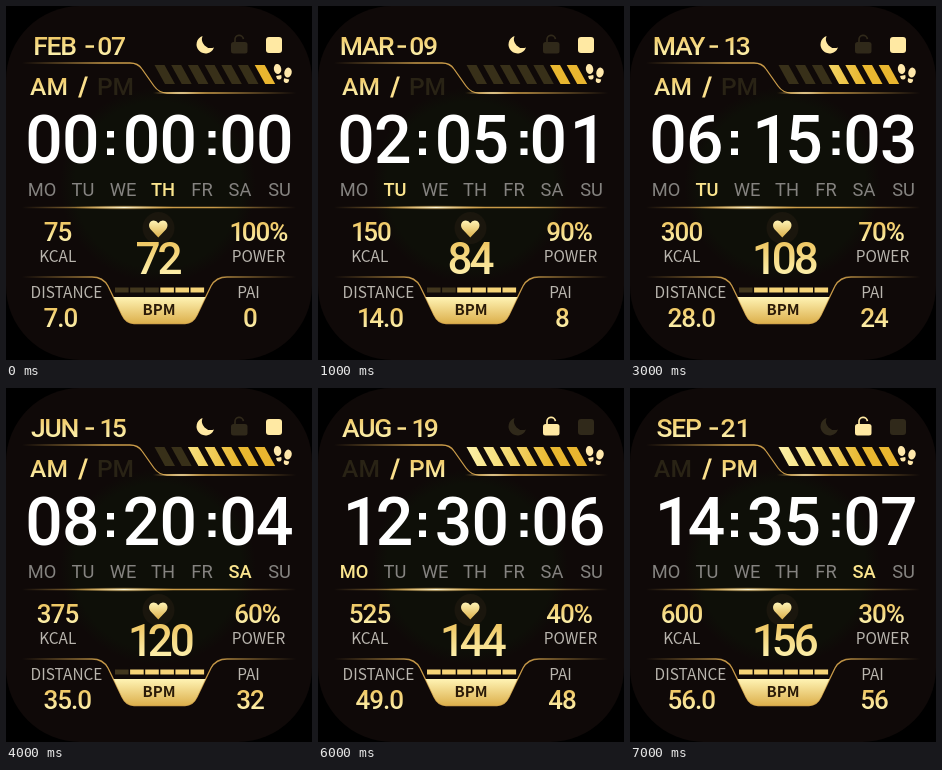
Animation of 306x354 px, one loop 8 s. Source, as an HTML page:

```html
<!DOCTYPE html>
<html lang="en">
<head>
<meta charset="utf-8">
<title>Watch face</title>
<style>
  html, body { margin: 0; width: 100%; height: 100%; overflow: hidden; background: #000; }
  svg { display: block; width: 306px; height: 354px; }
  text { font-family: Roboto, sans-serif; text-anchor: middle; }
  .gold { fill: url(#gold); font-weight: 500; }
  .date { font-size: 26.5px; letter-spacing: -1.3px; }
  .half { font-size: 24.5px; }
  .time text { font-size: 66px; font-weight: 500; letter-spacing: -.8px; fill: #fff; }
  .days text { font-size: 18.3px; fill: #858380; }
  .days .on { fill: #fbe58e; font-weight: 500; }
  .value { font-size: 26px; letter-spacing: -1px; }
  .pulse { font-size: 44px; letter-spacing: -3px; }
  .label { font: 15.4px "Noto Sans CJK SC", "Noto Sans CJK JP", "Noto Sans", sans-serif; fill: #b9b5ae; }
  .bpm { font: 700 15px "Noto Sans CJK SC", "Noto Sans CJK JP", "Noto Sans", sans-serif; fill: #2a1a08; }
  .start { text-anchor: start; }
  .icon { color: #30291a; }
  .icon.on { color: #ffe9a3; }
  .half.off { fill: #292315; }
  .line { fill: none; stroke-width: 1.3; }
</style>
</head>
<body>
<svg viewBox="0 0 306 354">
  <defs>
    <linearGradient id="gold" x2="0" y2="1">
      <stop offset=".2" stop-color="#efc865"/>
      <stop offset=".8" stop-color="#fdf0ab"/>
    </linearGradient>
    <linearGradient id="cup" x2="0" y2="1">
      <stop stop-color="#fff3b4"/>
      <stop offset="1" stop-color="#dcb04c"/>
    </linearGradient>
    <linearGradient id="steps" gradientUnits="userSpaceOnUse" x1="150" x2="268" y1="0" y2="0">
      <stop stop-color="#fcf0a6"/>
      <stop offset=".3" stop-color="#f6dd78"/>
      <stop offset=".7" stop-color="#e9b830"/>
      <stop offset="1" stop-color="#e9b52f"/>
    </linearGradient>
    <linearGradient id="line" gradientUnits="userSpaceOnUse" x1="16" x2="290" y1="0" y2="0">
      <stop stop-color="#c89a48" stop-opacity="0"/>
      <stop offset=".3" stop-color="#c89a48"/>
      <stop offset=".7" stop-color="#c89a48"/>
      <stop offset="1" stop-color="#c89a48" stop-opacity="0"/>
    </linearGradient>
    <radialGradient id="glow">
      <stop stop-color="#fff8d6"/>
      <stop offset="1" stop-color="#e0a83c" stop-opacity="0"/>
    </radialGradient>
    <radialGradient id="dial">
      <stop offset=".85" stop-color="#0e0f08"/>
      <stop offset="1" stop-color="#0e0f08" stop-opacity="0"/>
    </radialGradient>
    <g id="foot">
      <ellipse cy="-2.500" rx="3.700" ry="5"/>
      <path d="M-2.600 4H2.600V5.500a2.600 2.600 0 0 1-5.200 0Z"/>
    </g>
  </defs>

  <rect width="306" height="354" rx="74" fill="#0f0908"/>
  <circle cx="152" cy="179" r="98" fill="url(#dial)"/>

  <path class="line" stroke="url(#line)" d="M16 57H124Q132 57 136 63L148 80Q153 87 161 87H290"/>
  <ellipse cx="175" cy="87" rx="30" ry="1.600" fill="url(#glow)"/>
  <path class="line" stroke="url(#line)" d="M16 201.500H290"/>
  <ellipse cx="118" cy="201.500" rx="55" ry="2.300" fill="url(#glow)"/>
  <path class="line" stroke="url(#line)"
    d="M16 271H86Q97 271 102 280L116 309Q120 317.500 128 317.500H179Q187 317.500 191 309L205 280Q210 271 221 271H290"/>
  <path fill="url(#cup)" d="M107.500 291H199.500L191 309Q187 317.500 179 317.500H128Q120 317.500 116 309Z"/>

  <text class="gold date" id="month" x="48.500" y="49"/>
  <rect x="79.500" y="39.300" width="8.500" height="2.500" fill="#fbe08c"/>
  <text class="gold date" id="day" x="105" y="49"/>
  <text class="gold half" id="am" x="43" y="89">AM</text>
  <path d="M79 70.500h2.900L75 91.500H72.100Z" fill="#fbe08c"/>
  <text class="gold half" id="pm" x="109.500" y="89">PM</text>

  <path class="icon" id="moon" fill="currentColor" d="M196.500 30A9 9 0 1 0 208 41.500A9 9 0 0 1 196.500 30Z"/>
  <g class="icon" id="lock">
    <rect x="225" y="36" width="16.500" height="11.500" rx="2.500" fill="currentColor"/>
    <path d="M229 37V34a4.200 4.200 0 0 1 8.400-.800" fill="none" stroke="currentColor" stroke-width="1.700"/>
  </g>
  <rect class="icon" id="link" x="260" y="31" width="16" height="16" rx="3" fill="currentColor"/>

  <g id="bars"/>
  <g fill="#ffe8ab">
    <use href="#foot" transform="translate(272 65.500) rotate(-10)"/>
    <use href="#foot" transform="translate(281.500 69) rotate(12)"/>
  </g>

  <g class="time">
    <text id="hour" x="56" y="157"/>
    <text id="minute" x="153.500" y="157"/>
    <text id="second" x="250" y="157"/>
    <path fill="#fff" d="M101 125h7v6.500h-7zM101 142.500h7v6.500h-7zM202.500 125h7v6.500h-7zM202.500 142.500h7v6.500h-7z"/>
  </g>
  <g class="days" id="days"/>

  <circle cx="152.500" cy="222" r="16" fill="#1a160d"/>
  <path fill="url(#cup)" d="M152.300 231.500L144.500 223.300C141.500 219.500 143.500 214.500 147.800 214.500Q150.800 214.500 152.300 217.300Q153.800 214.500 156.800 214.500C161.100 214.500 163.100 219.500 160.100 223.300Z"/>
  <text class="gold pulse" id="pulse" x="151.500" y="268"/>
  <g id="zones"/>
  <text class="bpm" x="153" y="309">BPM</text>

  <text class="gold value" id="kcal" x="51.500" y="235"/>
  <text class="label" x="51.700" y="256">KCAL</text>
  <text class="gold value" id="power" x="251" y="235"/>
  <text class="label" x="252.500" y="256">POWER</text>
  <text class="label" x="60.500" y="292">DISTANCE</text>
  <text class="gold value start" id="distance" x="37.500" y="321"/>
  <text class="label" x="242.500" y="292">PAI</text>
  <text class="gold value" id="pai" x="244" y="321"/>
</svg>
<script>
  const $ = id => document.getElementById(id);
  const MONTHS = ["FEB", "MAR", "APR", "MAY", "JUN", "JUL", "AUG", "SEP"];
  const DAYS = ["MO", "TU", "WE", "TH", "FR", "SA", "SU"];
  const DAY_X = [36, 77, 117, 157, 196, 234, 273.5];
  const BARS = 7, ZONES = 6;

  function add(parent, tag, attrs, text = "") {
    const el = document.createElementNS("http://www.w3.org/2000/svg", tag);
    for (const key in attrs) el.setAttribute(key, attrs[key]);
    el.textContent = text;
    return $(parent).appendChild(el);
  }

  const days = DAYS.map((d, i) => add("days", "text", { x: DAY_X[i], y: 190 }, d));
  const bars = Array.from({ length: BARS }, (_, i) =>
    add("bars", "path", { d: `M${148.5 + i * 16.7} 59h10l10.500 19h-10z` }));
  const zones = Array.from({ length: ZONES }, (_, i) =>
    add("zones", "rect", { x: 109 + i * 15.1, y: 281.5, width: 13.6, height: 5 }));

  const pad = n => String(n).padStart(2, "0");
  const light = (id, on) => $(id).classList.toggle("on", on);
  const fillLast = (list, count, on, off) => list.forEach((el, i) =>
    el.setAttribute("fill", i >= list.length - count ? on : off));

  // Centres each "1" in its digit cell without moving its neighbours.
  const nudge = c => c === "1" ? .055 : 0;
  function put(id, value) {
    const chars = [...String(value)];
    $(id).textContent = value;
    $(id).setAttribute("dx", chars.map((c, i) => nudge(c) - nudge(chars[i - 1]) + "em").join(" "));
  }

  function show(n) {
    const date = 7 + 2 * n, hour = 2 * n, pulse = 72 + 12 * n;
    put("month", MONTHS[n]);
    put("day", pad(date));
    put("hour", pad(hour));
    put("minute", pad(5 * n));
    put("second", pad(n));
    put("pulse", pulse);
    put("kcal", 75 * (n + 1));
    put("power", 100 - 10 * n + "%");
    put("distance", (7 * (n + 1)).toFixed(1));
    put("pai", 8 * n);

    // The weekday runs one month behind the date shown.
    const weekday = (new Date(2021, n, date).getDay() + 6) % 7;
    days.forEach((el, i) => el.classList.toggle("on", i === weekday));

    $("am").classList.toggle("off", hour >= 12);
    $("pm").classList.toggle("off", hour < 12);
    light("moon", n < 5);
    light("link", n < 5);
    light("lock", n > 5);
    fillLast(bars, n + 1, "url(#steps)", "#383019");
    fillLast(zones, Math.ceil(pulse / 24), "#f6d478", "#41361d");
  }

  let shown = -1;
  function tick() {
    const n = Math.floor(performance.now() / 1000) % 8;
    if (n !== shown) show(shown = n);
    requestAnimationFrame(tick);
  }
  tick();
</script>
</body>
</html>
```
